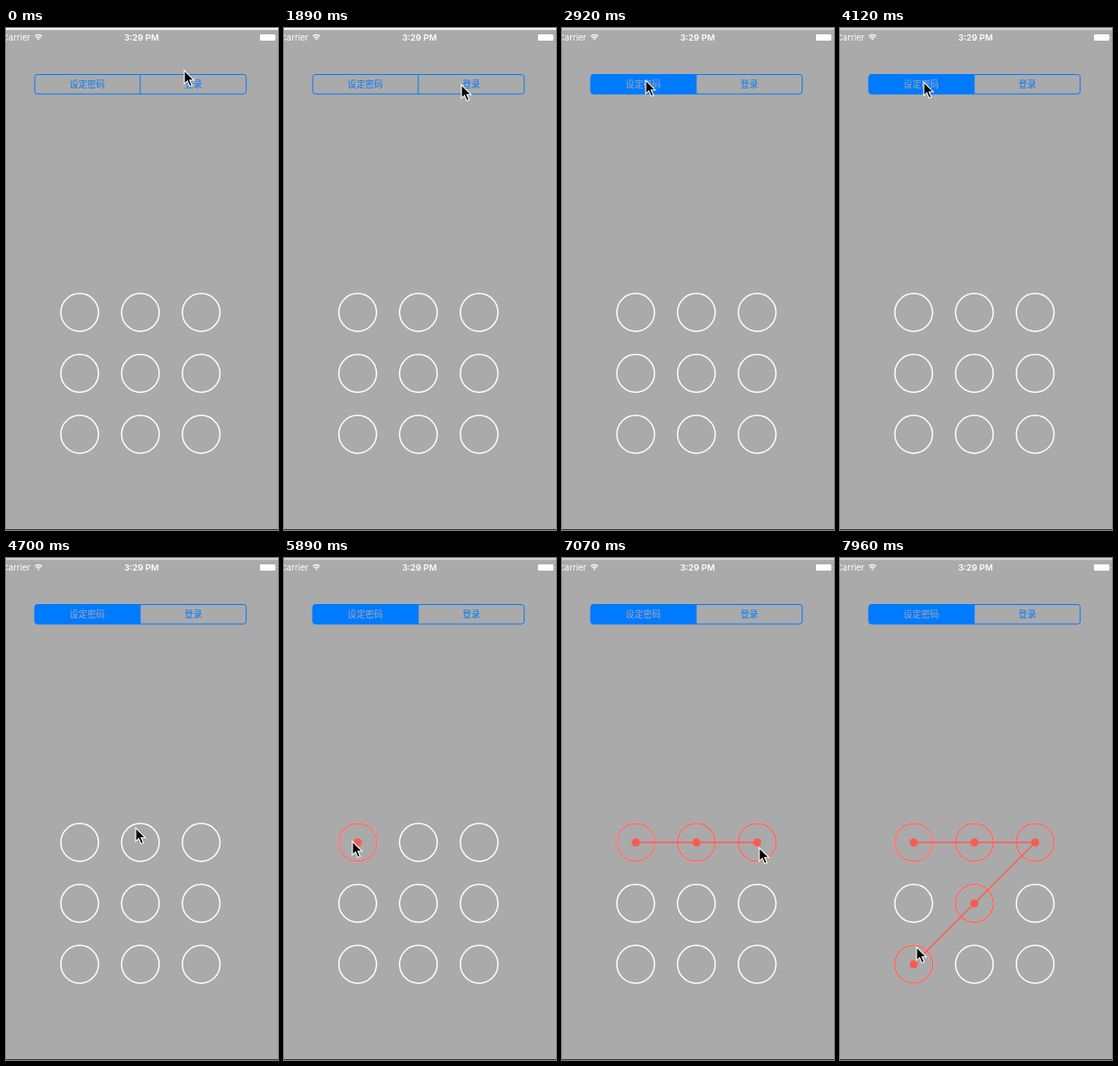
These frames come from a looping animation (302 by 556 pixels, 8 s). An HTML page:

```html
<!DOCTYPE html>
<html lang="zh">
<head>
<meta charset="utf-8">
<title>Pattern lock</title>
<style>
html, body { margin: 0; width: 100%; height: 100%; overflow: hidden; background: #aaa; }
svg { display: block; width: 100vw; height: 100vh; }
text { font-family: "Noto Sans CJK SC", "Noto Sans CJK", sans-serif; text-anchor: middle; }
.status { font-family: Inter, sans-serif; fill: #fff; }
.label { font-size: 9.8px; fill: #007aff; }

/* Everything shares one 8 s stepped clock: 1% = 80 ms */
.bar, .tint, .chosen, .hit, .cursor { animation: 8s step-end infinite; }
.bar { animation-name: bar; }
.tint { animation-name: tint; }
.chosen { animation-name: chosen; }
.cursor { animation-name: cursor; }
.h1 { animation-name: h1; }
.h2 { animation-name: h2; }
.h3 { animation-name: h3; }
.h4 { animation-name: h4; }
.h5 { animation-name: h5; }

@keyframes bar { 0% { fill: #f3f3f3; } 32.75%, to { fill: #d0d0d0; } }
@keyframes tint { 0% { opacity: 0; } 34.625% { opacity: .2; } 36.5%, to { opacity: 1; } }
@keyframes chosen { 0% { fill: #007aff; } 36.5%, to { fill: #aaa; } }

@keyframes h1 { 0% { opacity: 0; } 73.625%, to { opacity: 1; } }
@keyframes h2 { 0% { opacity: 0; } 79.25%, to { opacity: 1; } }
@keyframes h3 { 0% { opacity: 0; } 82.875%, to { opacity: 1; } }
@keyframes h4 { 0% { opacity: 0; } 94%, to { opacity: 1; } }
@keyframes h5 { 0% { opacity: 0; } 99.5%, to { opacity: 1; } }

@keyframes cursor {
  0% { transform: translate(198px, 47px); }
  6.75% { transform: translate(198px, 50px); }
  8.625% { transform: translate(197px, 59px); }
  10.5% { transform: translate(197px, 62px); }
  23.625% { transform: translate(197px, 63px); }
  25.375% { transform: translate(175px, 62px); }
  27.25% { transform: translate(118px, 57px); }
  29.125% { transform: translate(93px, 58px); }
  51.5% { transform: translate(93px, 60px); }
  53.375% { transform: translate(94px, 74px); }
  55.125% { transform: translate(108px, 126px); }
  57% { transform: translate(135px, 232px); }
  58.75% { transform: translate(144px, 299px); }
  60.625% { transform: translate(127px, 315px); }
  62.5% { transform: translate(104px, 314px); }
  66.25% { transform: translate(98px, 314px); }
  68.125% { transform: translate(83px, 315px); }
  70% { transform: translate(76px, 314px); }
  75.5% { transform: translate(86px, 315px); }
  77.375% { transform: translate(110px, 316px); }
  79.25% { transform: translate(140px, 316px); }
  81% { transform: translate(172px, 316px); }
  82.875% { transform: translate(207px, 316px); }
  84.75% { transform: translate(234px, 316px); }
  86.625% { transform: translate(227px, 317px); }
  88.375% { transform: translate(219px, 321px); }
  90.25% { transform: translate(202px, 334px); }
  92.125% { transform: translate(179px, 354px); }
  94% { transform: translate(154px, 375px); }
  95.75% { transform: translate(128px, 397px); }
  97.625% { transform: translate(103px, 417px); }
  99.5%, to { transform: translate(85px, 431px); }
}
</style>
</head>
<body>
<svg viewBox="0 0 302 556">
  <defs>
    <circle id="ring" r="20.9" fill="none" stroke-width="1.5"/>
    <g id="row">
      <use href="#ring" x="81.8"/>
      <use href="#ring" x="149.2"/>
      <use href="#ring" x="216.7"/>
    </g>
    <g id="node">
      <use href="#ring"/>
      <circle r="4.5" fill="#fc5a50" stroke="none"/>
    </g>
  </defs>

  <rect width="302" height="556" fill="#aaa"/>
  <rect class="bar" width="302" height="2.2"/>
  <rect y="555" width="302" height="1" fill="#333"/>

  <!-- status bar -->
  <text class="status" x="11.5" y="14" font-size="9.6">Carrier</text>
  <g fill="none" stroke="#fff" stroke-width="1.3">
    <path d="M31.9 9.1q4.1-3.4 8.2 0M33.4 10.9q2.6-2.1 5.2 0"/>
    <path d="M34.6 12.1q1.4-1 2.8 0L36 13.8z" fill="#fff" stroke="none"/>
  </g>
  <text class="status" x="150.5" y="14" font-size="9.6" font-weight="600">3:29 PM</text>
  <rect x="282" y="7" width="17" height="7" rx="1.3" fill="#fff"/>
  <path d="M299.8 9q1.4 1.5 0 3z" fill="#fff"/>

  <!-- segmented control -->
  <path class="tint" d="M149 51.5H35q-3 0-3 3v15.5q0 3 3 3h114z" fill="#007aff"/>
  <g fill="none" stroke="#007aff">
    <rect x="31.9" y="51.5" width="234.8" height="21.6" rx="3"/>
    <path d="M149 51.5v21.6"/>
  </g>
  <text class="label chosen" x="90.2" y="66">设定密码</text>
  <text class="label" x="208" y="66">登录</text>

  <!-- pattern grid -->
  <g stroke="#fff">
    <use href="#row" y="315"/>
    <use href="#row" y="382.5"/>
    <use href="#row" y="450"/>
  </g>
  <g stroke="#fc5a50" stroke-width="1.4">
    <use class="hit h1" href="#node" x="81.8" y="315"/>
    <g class="hit h2"><path d="M81.8 315H149.2"/><use href="#node" x="149.2" y="315"/></g>
    <g class="hit h3"><path d="M149.2 315H216.7"/><use href="#node" x="216.7" y="315"/></g>
    <g class="hit h4"><path d="M216.7 315L149.2 382.5"/><use href="#node" x="149.2" y="382.5"/></g>
    <g class="hit h5"><path d="M149.2 382.5L81.8 450"/><use href="#node" x="81.8" y="450"/></g>
  </g>

  <path class="cursor" d="M0 0V14.8L3.4 11.6L6 17.6L8.6 16.5L6 10.7H10.6Z"
        fill="#000" stroke="#fff" stroke-width="1.1"/>
</svg>
</body>
</html>
```
